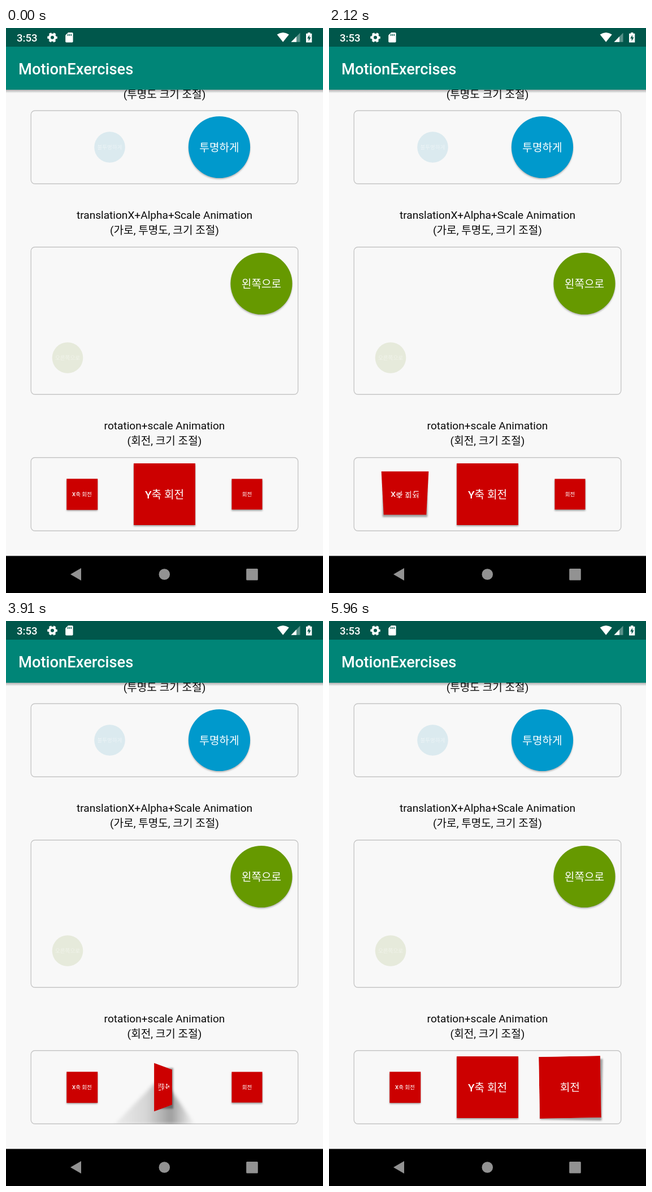
Recreate the animation shown at these times as an HTML page. Size 561x998 px, loop 6.58 s.

```html
<!DOCTYPE html>
<html lang="ko">
<head>
<meta charset="utf-8">
<title>MotionExercises</title>
<style>
html, body { margin: 0; width: 100%; height: 100%; overflow: hidden; background: #f8f8f8; }
svg { display: block; font-family: Roboto, "Noto Sans CJK KR", "Noto Sans CJK", sans-serif; }
#stage { position: absolute; left: 0; top: 0; }
.label { font-size: 19.1px; text-anchor: middle; fill: #0a0a0a; }
.face { font-size: 19.1px; text-anchor: middle; fill: #fff; }
.small { font-size: 9.55px; }
.medium { font-weight: 500; }
.frame { fill: none; stroke: #c6c6c6; stroke-width: 1.4; }
.tile { position: absolute; top: 769px; width: 109px; height: 109px; transform-origin: 50% 50%; }
</style>
</head>
<body>
<svg id="stage" width="561" height="998" viewBox="0 0 561 998">
  <defs>
    <filter id="soft" x="-20%" y="-20%" width="140%" height="140%"><feGaussianBlur stdDeviation="1.5"/></filter>
    <filter id="wide" x="-20%" y="-20%" width="140%" height="140%"><feGaussianBlur stdDeviation="3"/></filter>
    <linearGradient id="barShade" x2="0" y2="1">
      <stop offset="0" stop-opacity=".3"/><stop offset="1" stop-opacity="0"/>
    </linearGradient>
    <linearGradient id="castShade">
      <stop offset="0" stop-opacity=".05"/><stop offset=".4" stop-opacity=".14"/>
      <stop offset=".7" stop-opacity=".36"/><stop offset="1" stop-opacity="0"/>
    </linearGradient>
    <clipPath id="card"><rect x="44" y="759" width="473" height="130" rx="7"/></clipPath>
  </defs>
  <rect width="561" height="998" fill="#f8f8f8"/>

  <g class="label">
    <text x="280.5" y="123.5">(투명도 크기 조절)</text>
    <text x="280.5" y="337">translationX+Alpha+Scale Animation</text>
    <text x="280.5" y="364">(가로, 투명도, 크기 조절)</text>
    <text x="280.5" y="709">rotation+scale Animation</text>
    <text x="280.5" y="736">(회전, 크기 조절)</text>
  </g>
  <g class="frame">
    <rect x="44.2" y="146" width="472.6" height="129.3" rx="7"/>
    <rect x="44.2" y="387" width="472.6" height="260.3" rx="7"/>
    <rect x="44.2" y="758.7" width="472.6" height="129.6" rx="7"/>
  </g>

  <circle cx="183.5" cy="210.5" r="27.3" fill="#dbeaef"/>
  <text class="face small" x="183.5" y="214" fill-opacity=".45">불투명하게</text>
  <circle cx="377.5" cy="212.5" r="54.3" opacity=".3" filter="url(#soft)"/>
  <circle cx="377.5" cy="210.5" r="54.6" fill="#0099cc"/>
  <text class="face" x="377.5" y="217.5">투명하게</text>

  <circle cx="109" cy="582.5" r="27.3" fill="#e6eadb"/>
  <text class="face small" x="109" y="586" fill-opacity=".45">오른쪽으로</text>
  <circle cx="452" cy="453.5" r="54.3" opacity=".3" filter="url(#soft)"/>
  <circle cx="452" cy="451.5" r="54.6" fill="#669900"/>
  <text class="face" x="452" y="458.5">왼쪽으로</text>

  <g id="shadows" clip-path="url(#card)"></g>

  <rect y="109" width="561" height="6" fill="url(#barShade)"/>
  <rect y="32" width="561" height="77" fill="#008577"/>
  <rect width="561" height="33" fill="#00574b"/>
  <text class="medium" x="22" y="81.5" font-size="27.3" fill="#fff">MotionExercises</text>
  <text class="medium" x="19" y="23.5" font-size="18.6" fill="#fff">3:53</text>

  <g fill="none" stroke="#fff">
    <circle cx="82" cy="16.8" r="5" stroke-width="4"/>
    <circle cx="82" cy="16.8" r="7.5" stroke-width="2.6" stroke-dasharray="4.3 3.554" stroke-dashoffset="2.15"/>
  </g>
  <path d="M110 8h7q1.6 0 1.6 1.6v14.2q0 1.6-1.6 1.6h-10.200q-1.600 0-1.600-1.600v-11z" fill="#fff"/>
  <path d="M109.600 10.500v3.600M112.500 10.500v3.600M115.400 10.500v3.600" stroke="#00574b" stroke-width="1.400"/>
  <path d="M490.200 24.800L479.600 11.600Q490.200 4.200 500.800 11.600Z" fill="#fff"/>
  <path d="M504.500 24.800L520.500 8.500V24.800Z" fill="#fff" opacity=".35"/>
  <path d="M504.500 24.800L514 15.100V24.800Z" fill="#fff"/>
  <path d="M534 8h4.400v1.800h2.900v15.600h-10.300v-15.600h3z" fill="#fff"/>
  <path d="M537 12.200l-4 6.400h2.600v4.600l4-6.600h-2.600z" fill="#00574b"/>

  <rect y="932.500" width="561" height="66"/>
  <g fill="#929292">
    <path d="M114 965L133 954V976Z"/>
    <circle cx="280.300" cy="965" r="9.800"/>
    <rect x="425.200" y="955" width="20.600" height="20.600" rx="1.500"/>
  </g>
</svg>

<script>
const LOOP = 6580, SPIN = 1000, SIZE = 109, MID_Y = 823.5, DEPTH = 207;
const NS = "http://www.w3.org/2000/svg";

// Each tile spins once within its own scene [from, to); the pose rests at `last`.
const tiles = [
  { axis: "X", x: 134.5, label: "축 회전", from: 0, to: 3200, start: 1647, last: 2610, step: 44.6, s0: 0.5, s1: 1 },
  { axis: "Y", x: 280.5, label: "축 회전", from: 3200, to: 4880, start: 3293, last: 4260, step: 43.8, s0: 1, s1: 0.5 },
  { axis: "", x: 426.5, label: "회전", from: 4880, to: LOOP, start: 4994, last: 5960, step: 44.8, s0: 0.5, s1: 1 }
];

function add(parent, name, attrs) {
  const el = document.createElementNS(NS, name);
  for (const key in attrs) el.setAttribute(key, attrs[key]);
  return parent.appendChild(el);
}

const shadows = document.getElementById("shadows");
for (const tile of tiles) {
  tile.cast = add(shadows, "polygon", { fill: "url(#castShade)", filter: "url(#wide)" });
  tile.drop = add(shadows, "rect", { "fill-opacity": 0.36, filter: "url(#soft)" });
  tile.el = document.createElement("div");
  tile.el.className = "tile";
  tile.el.style.left = tile.x - SIZE / 2 + "px";
  tile.el.innerHTML = `<svg width="109" height="109"><rect width="109" height="109" fill="#cc0000"/>
    <text class="face" x="54.5" y="61.5"><tspan class="medium">${tile.axis}</tspan>${tile.label}</text></svg>`;
  document.body.appendChild(tile.el);
}

function progress(tile, time) {
  if (time < tile.from || time >= tile.to) return 0;
  const left = Math.max(0, tile.last - time);
  const now = tile.last - Math.ceil(left / tile.step) * tile.step;
  const u = Math.min(1, Math.max(0, (now - tile.start) / SPIN));
  return (1 - Math.cos(Math.PI * u)) / 2;
}

function drawTile(tile, time) {
  const p = progress(tile, time);
  const angle = 360 * p, rad = angle * Math.PI / 180;
  const scale = tile.s0 + (tile.s1 - tile.s0) * p;
  const turn = tile.axis ? `rotate${tile.axis}` : "rotate";
  const view = tile.axis && p ? `perspective(${DEPTH}px) ` : "";
  tile.el.style.transform = `${view}${turn}(${angle}deg) scale(${scale})`;

  const flat = Math.abs(Math.cos(rad));
  const w = SIZE * scale * (tile.axis === "Y" ? flat : 1);
  const h = SIZE * scale * (tile.axis === "X" ? flat : 1);
  const dx = tile.axis || !p ? 0 : 2.5;
  const spin = tile.axis || !p ? 0 : angle + 2;
  const drop = { x: -w / 2, y: -h / 2, width: w, height: h,
    transform: `translate(${tile.x + dx} ${MID_Y + (dx ? 3.5 : 2)}) rotate(${spin})` };
  for (const key in drop) tile.drop.setAttribute(key, drop[key]);

  // A tilted tile stands off the page and throws a long wedge.
  const k = tile.axis ? Math.abs(Math.sin(rad)) * scale : 0;
  const side = tile.axis === "Y" && Math.sin(rad) * Math.cos(rad) < 0 ? -1 : 1;
  const wedge = [[-28, -13], [22, 13], [90, 110], [-147, 110]];
  tile.cast.setAttribute("points", wedge.map(([x, y]) => `${x * k},${y * k}`).join(" "));
  tile.cast.setAttribute("transform", `translate(${tile.x} ${MID_Y}) scale(${side} 1)`);
  tile.cast.setAttribute("opacity", Math.min(1, k * 1.7));
}

function render(now) {
  const time = (now - begin) % LOOP;
  for (const tile of tiles) drawTile(tile, Math.max(0, time));
  requestAnimationFrame(render);
}

const begin = performance.now();
render(begin);
</script>
</body>
</html>
```
